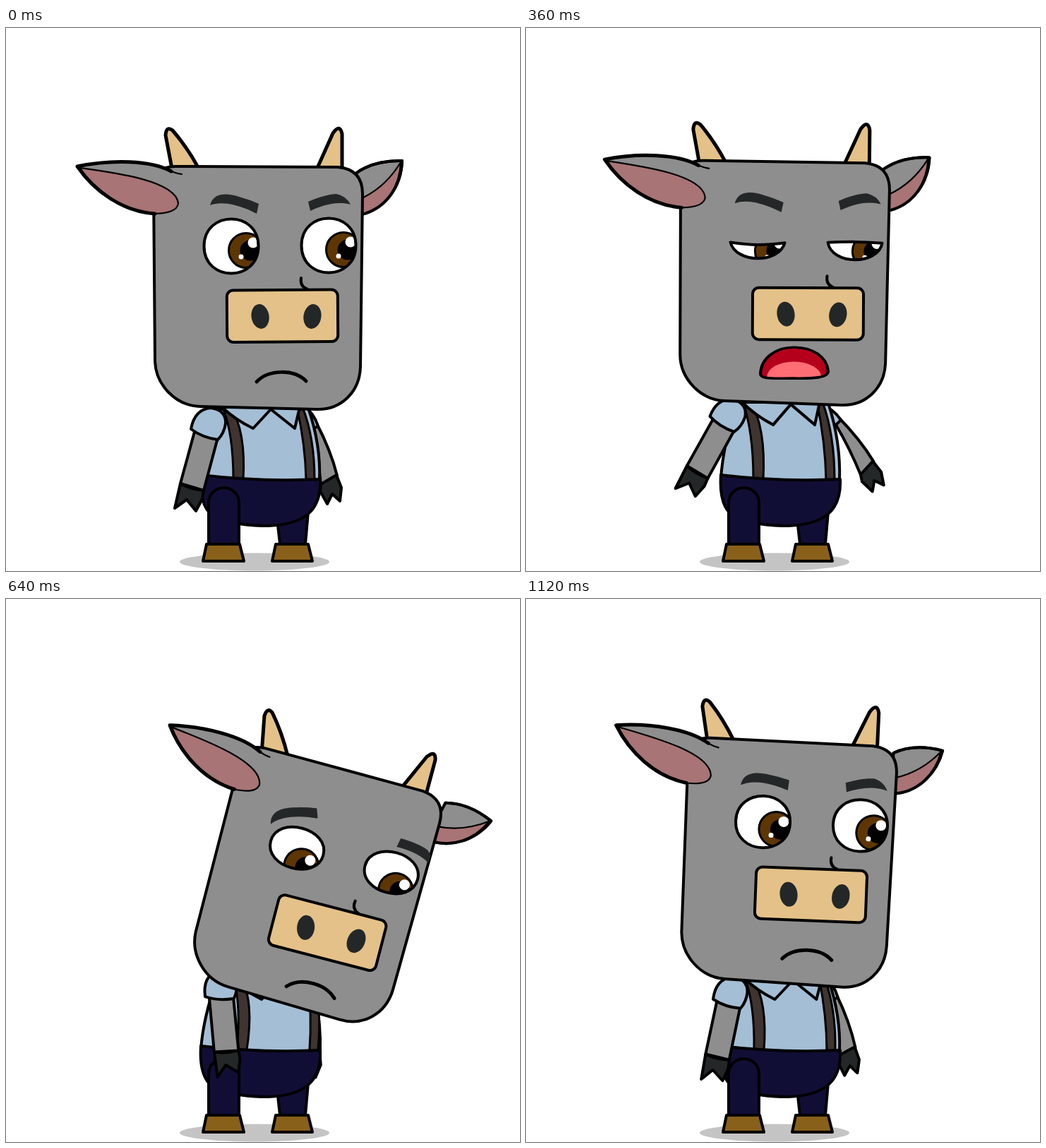
Write an HTML page that moves like this. It is 728x769 px and loops after 1160 ms.

```html
<!DOCTYPE html>
<html lang="en">
<head>
<meta charset="utf-8">
<title>Bull</title>
<style>
  html, body { margin: 0; width: 100%; height: 100%; overflow: hidden; background: #fff; }
  svg { display: block; width: 100vw; height: 100vh; }
  .ink { stroke: #000; stroke-width: 4; stroke-linejoin: round; stroke-linecap: round; }
  .thin { stroke-width: 2.2; }
  .bold { stroke-width: 5; }
  .line { fill: none; }
  .skin { fill: #8e8e8e; }
  .shirt { fill: #a4bed5; }
  .navy { fill: #110e36; }
  .shoe { fill: #88601a; }
  .tan { fill: #e4c188; }
  .pink { fill: #a87475; }
  .dark { fill: #232727; }
  .strap { fill: #3f342f; stroke-width: 3; }
</style>
</head>
<body>
<svg viewBox="0 0 728 769">
  <defs>
    <path id="headShape" d="M240 196L470 197Q505 200 505 235L502 480C501 515 475 541 440 540L275 536C240 535 212 505 211 472L209 225Q210 196 240 196Z"/>
    <clipPath id="headClip"><use href="#headShape"/></clipPath>
    <path id="mouthShape" d="M-46 17C-45 -8 -25 -24 0 -24S44 -10 46 12C47 23 25 24 0 24S-47 27 -46 17Z"/>
    <clipPath id="mouthClip"><use href="#mouthShape"/></clipPath>
    <clipPath id="clipL"><path id="cutL"/></clipPath>
    <clipPath id="clipR"><path id="cutR"/></clipPath>
    <g id="iris">
      <circle cx="21" cy="6" r="24.5" fill="#5e3604" stroke="#000" stroke-width="3"/>
      <circle cx="27" cy="6" r="14.5"/>
      <circle cx="31" cy="-5" r="7.5" fill="#fff"/>
      <circle cx="14" cy="15" r="3.5" fill="#fff"/>
    </g>
  </defs>

  <ellipse cx="352" cy="756" rx="106" ry="12.5" fill="#c4c4c4"/>

  <g id="armR" class="ink">
    <path class="skin" d="M426 555L433 568Q442 605 446 647L469 634Q460 598 439 558Z"/>
    <path class="dark" d="M446 646L468 633L475 651L473 670L462 660L455 674L445 656Z"/>
    <path class="shirt" d="M422 536Q436 545 442 564L432 569L420 552Z"/>
  </g>

  <path class="navy ink" d="M384 695L388 731H424L428 685Z"/>
  <path class="shoe ink" d="M382 731H428L434 755H377Z"/>
  <path id="torso" class="shirt ink" d="M298 540Q279 595 276 638Q360 646 444 640Q446 590 428 538Z"/>
  <g id="straps" class="ink">
    <path class="strap" d="M307 537Q322 575 322 640L336 640Q340 570 318 537Z"/>
    <path class="strap" d="M412 537Q424 590 425 640L437 640Q437 580 420 537Z"/>
    <path class="shirt" d="M306 537Q325 555 350 567L375 540L409 567L416 537Z"/>
  </g>
  <path class="navy ink" d="M276 633Q360 643 445 639C447 682 424 703 372 705Q330 705 300 695C279 686 274 662 276 633Z"/>
  <path class="navy ink" d="M287 731V673C287 644 330 644 330 673V731Z"/>
  <path class="shoe ink" d="M284 731H331L337 755H279Z"/>

  <g id="armL" class="ink">
    <g id="foreL">
      <path class="skin" d="M268 568L247 645L280 655L300 580Z"/>
      <path class="dark" d="M247 645Q261 653 280 655L278 667L269 684L256 668L239 680Z"/>
    </g>
    <path id="sleeveL" class="shirt" d="M262 568Q267 540 290 538Q312 541 311 560Q309 574 300 583Q278 580 262 568Z"/>
  </g>

  <g id="head">
    <g id="earR" class="ink">
      <path class="skin" d="M494 207Q520 187 561 188C560 222 540 255 504 264Z"/>
      <path class="pink thin" d="M504 241Q538 225 559 190C558 222 540 255 504 264Z"/>
      <path class="line" d="M494 207Q520 187 561 188C560 222 540 255 504 264"/>
    </g>
    <path class="tan ink bold" d="M235 199L226 152Q227 138 236 145Q256 168 273 199Z"/>
    <path class="tan ink bold" d="M441 198L463 149Q473 135 476 150L476 199Z"/>
    <use href="#headShape" class="skin ink"/>

    <g id="earL">
      <path class="skin" d="M100 196C150 183 205 188 234 203L250 210L246 257Q230 266 211 264C165 260 125 232 100 196Z"/>
      <path class="pink ink thin" d="M104 198C155 205 240 216 244 248Q243 262 211 263C165 258 128 232 104 198Z"/>
      <path class="ink line bold" d="M234 203C205 187 150 186 101 196C125 231 165 260 211 263"/>
      <path class="ink line thin" d="M230 201Q240 206 249 207"/>
    </g>

    <g clip-path="url(#headClip)"><g id="face">
      <path id="browL" class="dark" d="M289 251C294 232 314 234 330 239Q345 243 358 249L355 263C338 254 309 243 289 251Z"/>
      <path id="browR" class="dark" d="M428 246C444 239 459 235 468 235Q482 238 488 250C470 245 450 250 431 259Z"/>

      <g transform="translate(319 309)">
        <path id="whiteL" fill="#fff"/>
        <g clip-path="url(#clipL)"><use href="#iris" id="lookL"/></g>
        <path id="rimL" class="ink line"/>
      </g>
      <g transform="translate(457 308)">
        <path id="whiteR" fill="#fff"/>
        <g clip-path="url(#clipR)"><use href="#iris" id="lookR"/></g>
        <path id="rimR" class="ink line"/>
      </g>

      <g id="snout">
        <path class="ink line" d="M418 354Q416 366 427 370"/>
        <rect class="tan ink" x="313" y="371" width="157" height="73.5" rx="9" transform="rotate(-.4 391 408)"/>
        <ellipse class="dark" cx="360" cy="408.5" rx="12.5" ry="17.5" transform="rotate(-9 360 408)"/>
        <ellipse class="dark" cx="434" cy="408.5" rx="12.5" ry="17.5" transform="rotate(9 434 408)"/>
      </g>

      <path id="frown" class="ink line bold" d="M355 501C372 483 408 483 425 500"/>
      <g id="mouth">
        <use href="#mouthShape" fill="#b5001c"/>
        <ellipse cy="22" rx="37" ry="24" fill="#ff6d74" clip-path="url(#mouthClip)"/>
        <use href="#mouthShape" class="ink line"/>
      </g>
    </g></g>
  </g>
</svg>

<script>
const LOOP = 1160, STEP = 40, HIP = 638, EYE = 38.5;
const { sin, cos, PI, abs, min, max } = Math;
const el = id => document.getElementById(id);
const set = (id, name, value) => el(id).setAttribute(name, value);
const move = (id, value) => set(id, 'transform', value);
const show = (id, on) => set(id, 'visibility', on ? 'visible' : 'hidden');
const ramp = (t, from, to) => min(1, max(0, (t - from) / (to - from)));
const mix = (a, b, k) => a + (b - a) * k;

// Two lids meeting at the corners; shallow lids get pointed corners.
function eyePath(top, low, y) {
  const lid = (from, h) => {
    const inset = EYE * 0.9 * (1 - min(1, abs(h) / 29));
    const x = from - Math.sign(from) * inset, c = y + h * 4 / 3;
    return `C${x} ${c} ${-x} ${c} ${-from} ${y}`;
  };
  return `M${-EYE} ${y}${lid(-EYE, -top)}${lid(EYE, low)}Z`;
}

function drawEye(side, t, bend, squint, openPower) {
  const shut = ramp(t, 0, 120) - ramp(t, 280, 440) ** openPower;
  const open = mix(EYE, 29, bend);
  const d = eyePath(mix(open, -17, shut), mix(open, 17, shut), 3 * shut - 6 * bend);
  for (const part of ['cut', 'white', 'rim']) set(part + side, 'd', d);
  move('look' + side, `translate(${-8.5 * bend} ${11 * bend + 8 * squint})`);
}

function drawHead(t, bend, lift, squint, drift, settle) {
  const drop = ramp(t, 360, 440), talk = 1 - drop;
  const sway = -9 * sin(2 * PI * (t - 145) / 320) * ramp(t, 0, 160) * talk;
  const x = 397 + sway + bend * (69 - 8.5 * drift);
  const y = 408 - 13 * lift + bend * (62 - 23.5 * settle);
  const tilt = -1.7 * sin(PI * t / 320) * talk + bend * (15.2 - 2.2 * drift);
  move('head', `translate(${x} ${y}) rotate(${tilt}) translate(-397 -408)`);

  // The ears lag behind the drop, then swing.
  move('earL', `rotate(${drop * mix(-4.5, 5.5, ramp(t, 440, 1120))} 228 232)`);
  move('earR', `rotate(${-30 * drop * cos(2 * PI * (t - 440) / 520)} 505 235)`);

  move('face', `translate(0 ${18 * bend})`);
  move('snout', `translate(0 ${3.5 * squint})`);
  move('browL', `translate(${-21 * bend - 3 * squint} ${11 * bend + 5 * squint}) rotate(${-32 * bend} 323 249)`);
  move('browR', `translate(${26.5 * bend + 5 * squint} ${18 * bend + 5 * squint}) rotate(${24 * bend} 458 247)`);
  drawEye('L', t, bend, squint, 2);
  drawEye('R', t, bend, squint, 1.6);

  const talking = t >= 80 && t < 400;
  show('mouth', talking);
  show('frown', !talking);
  move('mouth', `translate(${377 - 4 * squint} 481) scale(${1 + 0.04 * squint} ${0.75 + 0.33 * lift})`);
  move('frown', `translate(0 ${-5 * bend})`);
}

function drawBody(t, bend, lift, squint, drift, settle) {
  const stretch = 1 + lift / 7, shift = HIP * (1 - stretch);
  move('torso', `matrix(1 0 0 ${stretch} 0 ${shift})`);
  move('straps', `matrix(1 0 ${-0.1 * bend} ${stretch} ${(5 + HIP / 10) * bend} ${shift})`);

  const out = sin(PI / 2 * ramp(t, 0, 300)) * (1 - ramp(t, 360, 440));
  move('armL', `translate(${-7 * lift + bend * (22 - 5 * drift)} ${-14 * out - 12 * bend})`);
  move('sleeveL', `rotate(${11 * out - bend * (18.5 - 4 * drift)} 284 576)`);
  move('foreL', `rotate(${14 * out - bend * (26 - 10 * settle)} 284 576)`);
  move('armR', `translate(${2 * squint} ${-10 * lift}) rotate(${-17 * out + bend * (26 - 17 * settle)} 430 555)`);
}

function draw(t) {
  const bend = ramp(t, 360, 440) - ramp(t, 1040, 1140);
  const lift = t < 480 ? sin(PI * t / 480) ** 2 : 0;
  const squint = ramp(t, 80, 360) * (1 - ramp(t, 360, 440));
  const rest = ramp(t, 440, 1040);
  const pose = [t, bend, lift, squint, rest ** 2, 1 - (1 - rest) ** 2];
  drawHead(...pose);
  drawBody(...pose);
}

function tick() {
  const t = performance.now() % LOOP;
  draw(Math.floor(t / STEP) * STEP);
  requestAnimationFrame(tick);
}
tick();
</script>
</body>
</html>
```
